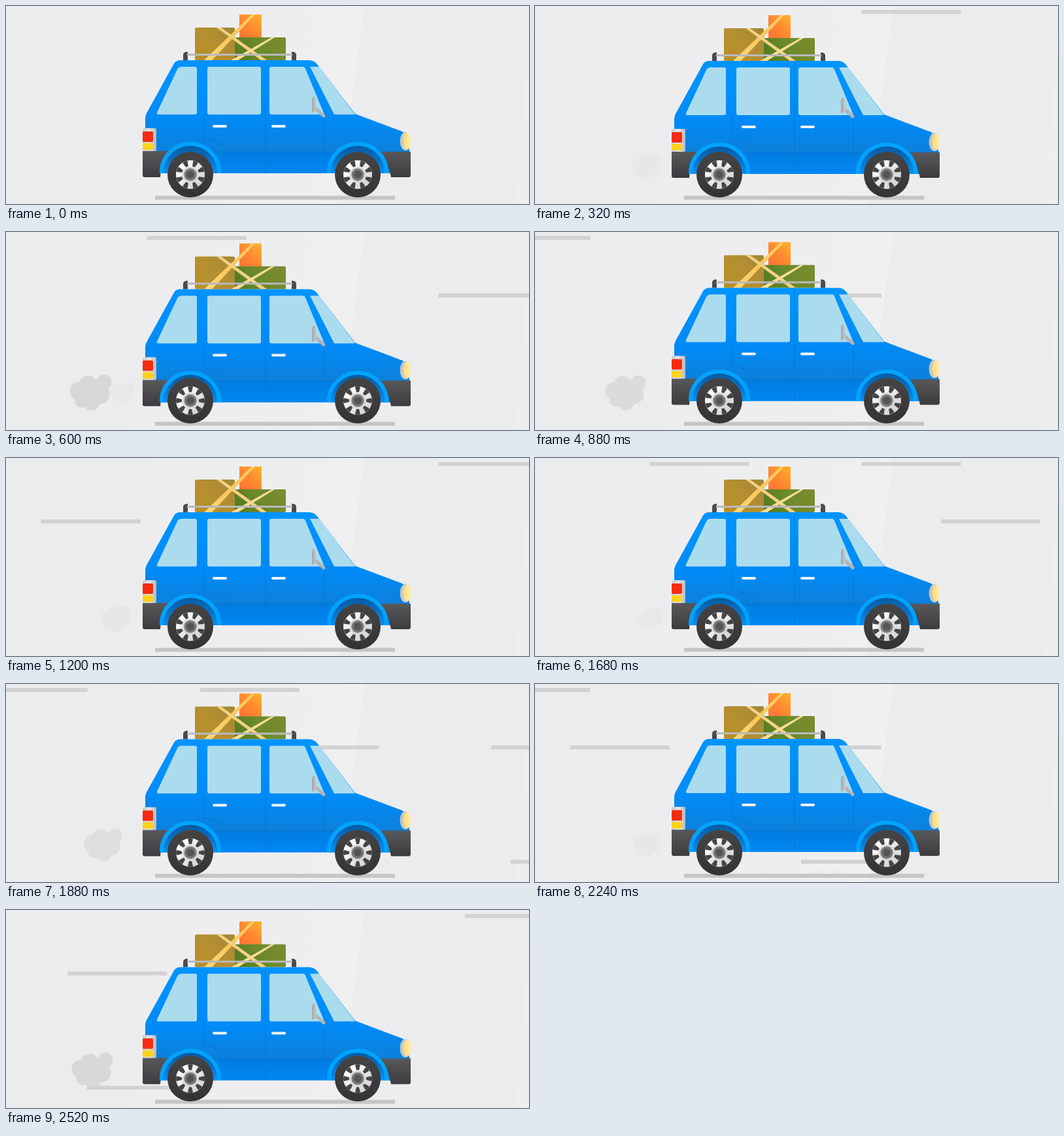
Recreate the animation shown at these times as an HTML page with a canvas. Size 800x303 px, loop 2.56 s.

```html
<!DOCTYPE html>
<html lang="en">
<head>
<meta charset="utf-8">
<title>Road trip</title>
<style>
html, body { margin: 0; height: 100%; overflow: hidden; background: #ebecee; }
canvas { display: block; }
</style>
</head>
<body>
<canvas id="stage" width="800" height="303"></canvas>
<script>
const ctx = document.getElementById('stage').getContext('2d');
const LOOP = 2560, STEP = 40, TAU = Math.PI * 2;

// Wind streaks: height and the times at which each enters on the right
const STREAKS = [[6, [23, 1063, 1383, 2423]], [94, [463, 1503, 1823]], [269, [1852]]];
const PUFF_STARTS = [0, 340, 870, 1410, 1935];
const PUFF = [[-18, -3, 14], [-4, -13, 14], [20, -16, 12], [14, 2, 15], [1, 14, 13], [-14, 11, 11], [0, 0, 14]];

function gradient(x0, y0, x1, y1, ...colors) {
  const g = ctx.createLinearGradient(x0, y0, x1, y1);
  colors.forEach((c, i) => g.addColorStop(i / (colors.length - 1), c));
  return g;
}

function shape(path, fill) {
  ctx.fillStyle = fill;
  ctx.fill(new Path2D(path));
}

function line(path, color, width, cap = 'butt') {
  ctx.strokeStyle = color;
  ctx.lineWidth = width;
  ctx.lineCap = cap;
  ctx.stroke(new Path2D(path));
}

function box(x, y, w, h, fill, r = 0) {
  ctx.fillStyle = fill;
  ctx.beginPath();
  ctx.roundRect(x, y, w, h, r);
  ctx.fill();
}

function disc(x, y, r, fill, ry = r) {
  ctx.fillStyle = fill;
  ctx.beginPath();
  ctx.ellipse(x, y, r, ry, 0, 0, TAU);
  ctx.fill();
}

function background() {
  box(0, 0, 800, 303, '#ebecee');
  shape('M228 0H548L508 303H194Z', gradient(200, 0, 530, 0, '#ededef', '#efeff0'));
  shape('M522 0H548L508 303H480Z', '#f0f0f1');
  shape('M803 0L780 303H800V0Z', '#eeeeef');
}

function streaks(t) {
  for (const [y, starts] of STREAKS)
    for (const s of starts)
      if (t > s) box(800 - 1.0125 * (t - s), y, 152, 6, '#d2d2d4');
}

function luggage() {
  box(289, 33, 61, 50, gradient(289, 83, 350, 33, '#b98f2a', '#b58f30', '#a08838'), 2);
  box(357, 13, 34, 36, gradient(357, 49, 391, 13, '#ff7136', '#ff8a30', '#ffb42c'), 1);
  box(350, 48, 78, 35, gradient(355, 83, 420, 48, '#557a22', '#6b8a29', '#7a8c30'), 2);
  shape('M303 83L376 13H381L315 83Z', gradient(309, 83, 379, 13, '#ffd878', '#fbc557', '#ffd06a'));
  shape('M322 33H329L399 83H390Z', '#f3d184');
  shape('M406 48H411L355 83H344Z', '#f6dc9a');
  shape('M271 83V75Q271 70 278 70V83ZM444 83V75Q444 70 437 70V83Z', '#4b4a4d');
  box(277, 73, 161, 3, '#b9babd');
}

function body() {
  shape('M257 88Q260 83 267 83H463Q473 83 478 92L534 165L606 192Q611 194 612 203L618 224V230H590V256H213V172Q213 168 215 164Z',
    gradient(0, 83, 0, 223, '#0094ff', '#0090fc', '#008af5', '#0d80da'));
  shape('M213 223H616V256H235Z', gradient(0, 223, 0, 256, '#007ce0', '#0087f2'));
  line('M302 166V203Q329 206 340 223M397 85V256M487 166V223M213 223H616', '#0872ca', 0.8);

  const glass = '#abdcee';
  shape('M269 93H289Q292 93 292 96V163Q292 166 289 166H233Q230 166 231 163L262 97Q264 93 269 93Z', glass);
  box(308, 93, 82, 73, glass, 3);
  shape('M406 93H454Q457 93 458 96L487 166H406Q403 166 403 163V96Q403 93 406 93Z', glass);
  shape('M465 93H479L534 166H502Z', glass);
  for (const x of [316, 406]) box(x, 182, 22, 4, '#f2f6f8', 2);
  line('M475 158L486 168', '#b2b4b8', 5, 'round');
  shape('M468 143Q469 138 473 139L475 161L468 163Z', gradient(468, 0, 475, 0, '#a5a6aa', '#c8c9cc'));

  const rubber = gradient(0, 222, 0, 262, '#59585a', '#3c3b3d');
  shape('M209 222H249Q238 236 236 262H212Q209 262 209 259Z', rubber);
  shape('M571 223H619V259Q619 262 616 262H589Q584 236 571 223Z', rubber);
  for (const x of [282, 538]) {
    shape(`M${x - 43} 256A43 43 0 0 1 ${x + 43} 256Z`, gradient(0, 213, 0, 256, '#075a9f', '#0870c4', '#0a8ff2'));
    line(`M${x - 44} 256V254A44 43 0 0 1 ${x + 44} 254V256`, '#00a3ff', 6);
  }

  box(209, 187, 21, 35, gradient(209, 0, 230, 0, '#c9cacd', '#e3e4e6', '#b8b9bc'), 2);
  box(209, 192, 16, 16, '#f52c10', 2);
  box(209, 210, 16, 10, '#ffd31c', 2);
  disc(611, 207, 8.5, gradient(603, 0, 619, 0, '#bfc0c0', '#dcdacd'), 14);
  disc(613.5, 206.5, 6, gradient(607, 0, 620, 0, '#ffd873', '#fff0b5'), 12.5);
}

function wheel(x, angle) {
  ctx.save();
  ctx.translate(x, 258);
  disc(0, 0, 35, gradient(0, -35, 0, 35, '#464445', '#343233'));
  disc(0, 0, 22, gradient(-16, -16, 16, 16, '#ffffff', '#d3d3d5'));
  ctx.rotate(angle + TAU / 16);
  for (let i = 0; i < 8; i++) {
    ctx.rotate(TAU / 8);
    shape('M-2 -13L-4 -21Q0 -23 4 -21L2 -13Z', '#454445');
  }
  disc(0, 0, 12, '#d5d5d7');
  disc(0, 0, 9.5, '#777779');
  disc(0, 0, 6, '#555456');
  ctx.restore();
}

function puff(age) {
  if (age <= 0 || age > 740) return;
  const grow = Math.sin(Math.min(1, age / 640) * Math.PI / 2);
  ctx.save();
  ctx.globalAlpha = Math.min(1, age / 650) ** 2 * Math.min(1, (740 - age) / 120);
  ctx.translate(215 - 0.142 * age, 246.5);
  ctx.scale(grow, grow);
  ctx.beginPath();
  for (const [x, y, r] of PUFF) {
    ctx.moveTo(x + r, y);
    ctx.arc(x, y, r, 0, TAU);
  }
  ctx.fillStyle = '#d3d4d5';
  ctx.fill();
  ctx.restore();
}

// A large dip followed by a small one, every 480 ms
function bounce(t) {
  const p = t % 480;
  const dip = (start, length, depth) =>
    p > start && p < start + length ? depth * Math.sin(Math.PI * (p - start) / length) : 0;
  return dip(0, 240, 4.5) + dip(296, 176, 2.6);
}

function draw(t) {
  background();
  streaks(t);
  box(228, 290.5, 367, 6, '#c5c5c7');
  ctx.save();
  ctx.translate(0, bounce(t));
  luggage();
  body();
  ctx.restore();
  for (const x of [282, 538]) wheel(x, TAU * t / 640);
  for (const s of PUFF_STARTS) puff(t - s);
}

const begin = performance.now();
function tick() {
  const t = (performance.now() - begin) % LOOP;
  draw(Math.floor(t / STEP) * STEP);
  requestAnimationFrame(tick);
}
tick();
</script>
</body>
</html>
```
